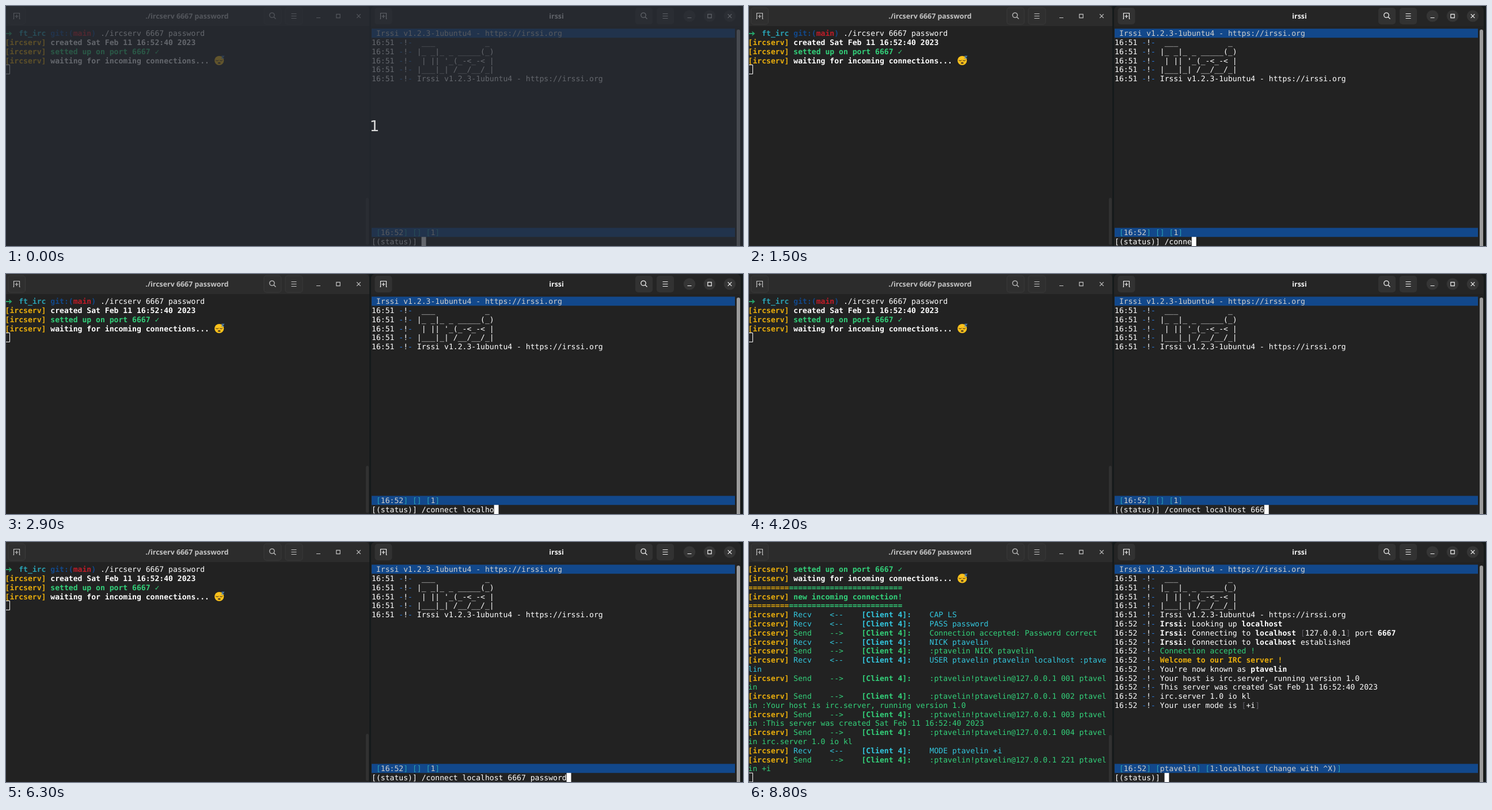
These frames come from a looping animation (1280 px wide and 418 px high, 9300 ms). An HTML page with a canvas:

```html
<!DOCTYPE html>
<html lang="en">
<head>
<meta charset="utf-8">
<title>IRC server demo</title>
<style>
html, body { margin: 0; width: 100%; height: 100%; overflow: hidden; background: #222; }
canvas { display: block; width: 1280px; height: 418px; }
</style>
</head>
<body>
<canvas id="stage" width="1280" height="418"></canvas>
<script>
const ctx = document.getElementById('stage').getContext('2d');
ctx.textRendering = 'geometricPrecision';
const LOOP = 9300, ENTER = 6500;
const CELL = 7.875, ROW = 15.77, TOP = 39.5, BASELINE = 12.9;
const LEFT = -1.5, RIGHT = 635;
const MONO = '13.08px "DejaVu Sans Mono", monospace';
const NICK = 'ptavelin';
const COMMAND = '/connect localhost 6667 password';
const KEY_TIMES = [
  500, 600, 1200, 1300, 1500, 1500, 1700, 2000, 2100, 2200, 2400,
  2500, 2600, 2600, 2800, 2900, 3000, 3100, 3400, 3900, 4000, 4200,
  4400, 4600, 5000, 5100, 5200, 5500, 5700, 5800, 5900, 6300
];

// Style letters for "~x" markup; an upper-case letter means bold.
const INK = {
  w: '#ffffff', y: '#e9ad0c', g: '#33d17a', c: '#33c7de', t: '#2aa1b3',
  b: '#12488b', r: '#c01c28', e: '#26a269', l: '#d0cfcc', d: '#5e5c64', u: '#2a7bde'
};

const TAG = '~Y[ircserv] ';
const READY = TAG + '~Gsetted up on port 6667 ~g✓';
const WAITING = TAG + '~Wwaiting for incoming connections...';
const RULE = '~Y' + '='.repeat(9) + '~G' + '='.repeat(25);
const recv = text => TAG + '~cRecv    <--    ~C[Client 4]:~c    ' + text;
const send = text => TAG + '~gSend    -->    ~G[Client 4]:~g    ' + text;

// Long messages continue on the next row after 39 characters.
function wrap(make, text) {
  const rest = text.slice(39);
  const style = make === recv ? '~c' : '~g';
  return rest ? [make(text.slice(0, 39)), style + rest] : [make(text)];
}
const reply = (code, text) =>
  wrap(send, `:${NICK}!${NICK}@127.0.0.1 ${code} ${NICK}${text}`);

const SERVER_IDLE = [
  '~T   ft_irc ~Bgit:(~Rmain~B) ~w./ircserv 6667 password',
  TAG + '~Wcreated Sat Feb 11 16:52:40 2023',
  READY,
  WAITING
];
const SERVER_BUSY = [
  READY, WAITING, RULE, TAG + '~Gnew incoming connection!', RULE,
  recv('CAP LS'),
  recv('PASS password'),
  send('Connection accepted: Password correct'),
  recv('NICK ' + NICK),
  send(`:${NICK} NICK ${NICK}`),
  ...wrap(recv, `USER ${NICK} ${NICK} localhost :${NICK}`),
  ...reply('001', ''),
  ...reply('002', ' :Your host is irc.server, running version 1.0'),
  ...reply('003', ' :This server was created Sat Feb 11 16:52:40 2023'),
  ...reply('004', ' irc.server 1.0 io kl'),
  recv(`MODE ${NICK} +i`),
  ...reply('221', ' +i')
];

const VERSION = 'Irssi v1.2.3-1ubuntu4 - https://irssi.org';
const note = (time, text) => `~w${time} ~u-~w!~u- ~w${text}`;
const BANNER = [
  ' ___' + ' '.repeat(11) + '_',
  '|_ _|_ _ _____(_)',
  " | || '_(_-<_-< |",
  '|___|_| /__/__/_|',
  VERSION
].map(text => note('16:51', text));
const JOINED = [
  '~WIrssi:~w Looking up ~Wlocalhost',
  '~WIrssi:~w Connecting to ~Wlocalhost ~d[~w127.0.0.1~d]~w port ~W6667',
  '~WIrssi:~w Connection to ~Wlocalhost~w established',
  '~gConnection accepted !',
  '~YWelcome to our IRC server !',
  "You're now known as ~W" + NICK,
  'Your host is irc.server, running version 1.0',
  'This server was created Sat Feb 11 16:52:40 2023',
  'irc.server 1.0 io kl',
  'Your user mode is ~d[~w+i~d]'
].map(text => note('16:52', text));

function box(x, y, w, h, color) {
  ctx.fillStyle = color;
  ctx.fillRect(x, y, w, h);
}

function round(x, y, w, h, r, color) {
  ctx.fillStyle = color;
  ctx.beginPath();
  ctx.roundRect(x, y, w, h, r);
  ctx.fill();
}

function stroke(color, width, draw) {
  ctx.strokeStyle = color;
  ctx.lineWidth = width;
  ctx.beginPath();
  draw();
  ctx.stroke();
}

function segment(x1, y1, x2, y2) {
  ctx.moveTo(x1, y1);
  ctx.lineTo(x2, y2);
}

function disc(x, y, r, color) {
  ctx.fillStyle = color;
  ctx.beginPath();
  ctx.arc(x, y, r, 0, Math.PI * 2);
  ctx.fill();
}

function label(text, x, y, font, color) {
  ctx.font = font;
  ctx.fillStyle = color;
  ctx.textAlign = 'center';
  ctx.fillText(text, x, y);
  ctx.textAlign = 'left';
}

// Writes one row of marked-up text on the character grid.
function line(x0, row, markup) {
  const y = TOP + row * ROW + BASELINE;
  let col = 0;
  for (const part of markup.split('~').slice(1)) {
    const key = part[0], low = key.toLowerCase();
    ctx.font = (key === low ? '' : 'bold ') + MONO;
    ctx.fillStyle = INK[low];
    for (const ch of part.slice(1)) {
      if (ch !== ' ') ctx.fillText(ch, x0 + col * CELL, y);
      col++;
    }
  }
}

function promptArrow() {
  const y = TOP + 8.5;
  stroke(INK.e, 2, () => segment(0, y, 7, y));
  ctx.fillStyle = INK.e;
  ctx.beginPath();
  ctx.moveTo(5, y - 4.5);
  ctx.lineTo(10.5, y);
  ctx.lineTo(5, y + 4.5);
  ctx.lineTo(6.5, y);
  ctx.fill();
}

function sleepyFace(row) {
  const x = 370.3, y = TOP + row * ROW + 8.2;
  disc(x, y, 8.1, '#fcc21b');
  stroke('#5f4a22', 1.2, () => {
    ctx.arc(x - 3.6, y - 1.6, 2.1, 0.2, Math.PI - 0.2);
    ctx.moveTo(x + 5.2, y - 1.2);
    ctx.arc(x + 3.2, y - 1.6, 2.1, 0.2, Math.PI - 0.2);
  });
  ctx.fillStyle = '#5f4a22';
  ctx.beginPath();
  ctx.ellipse(x, y + 4.2, 2.4, 1.8, 0, 0, Math.PI * 2);
  ctx.fill();
  stroke('#4a86c5', 1.2, () => {
    ctx.moveTo(x + 4, y - 7.6);
    ctx.lineTo(x + 8, y - 7.6);
    ctx.lineTo(x + 4.5, y - 4);
    ctx.lineTo(x + 8.5, y - 4);
  });
}

function button(cx, active) {
  if (active) return round(cx - 15, 3, 30, 29, 5, '#323232');
  round(cx - 15.5, 2.5, 31, 30, 5, '#3a3a3a');
  round(cx - 14.5, 3.5, 29, 28, 4, '#2f2f2f');
}

function header(title, center, tab, search, menu, controls, active) {
  const ink = active ? '#f2f2f2' : '#c4c4c4';
  [tab, search, menu].forEach(cx => button(cx, active));
  label(title, center, 22, 'bold 12.4px "Noto Sans", sans-serif', ink);
  stroke(ink, 1.2, () => {
    ctx.moveTo(tab - 6, 22.5);
    ctx.lineTo(tab - 5, 22.5);
    ctx.lineTo(tab - 5, 12.5);
    ctx.lineTo(tab + 5, 12.5);
    ctx.lineTo(tab + 5, 22.5);
    ctx.lineTo(tab + 6, 22.5);
    segment(tab - 3, 18, tab + 3, 18);
    segment(tab, 15, tab, 21);
  });
  stroke(ink, 1.3, () => {
    ctx.arc(search - 1, 16, 4.2, 0, Math.PI * 2);
    segment(search + 2, 19, search + 5.5, 22.5);
  });
  stroke(ink, 1.2, () => {
    for (const y of [13.5, 17.5, 21.5]) segment(menu - 4.5, y, menu + 4.5, y);
  });
  const [min, max, close] = controls;
  if (active) controls.forEach(cx => disc(cx, 17.5, 10.3, '#353535'));
  stroke(ink, 1.2, () => {
    segment(min - 3.5, 20.5, min + 3.5, 20.5);
    ctx.rect(max - 3.2, 14.3, 6.4, 6.4);
    segment(close - 3.3, 14.2, close + 3.3, 20.8);
    segment(close + 3.3, 14.2, close - 3.3, 20.8);
  });
}

function serverWindow(joined) {
  box(0, 0, 631, 418, '#222222');
  round(0, 0, 631, 35, [0, 7, 0, 0], '#2c2c2c');
  header('./ircserv 6667 password', 314.5, 18.5, 463, 500, [542.5, 577, 612.5], false);
  const rows = joined ? SERVER_BUSY : SERVER_IDLE;
  rows.forEach((text, i) => line(LEFT, i, text));
  if (!joined) promptArrow();
  sleepyFace(joined ? 1 : 3);
  const y = TOP + rows.length * ROW;
  stroke('#ffffff', 1, () => ctx.rect(LEFT + 0.5, y, CELL - 0.4, ROW));
  round(625, joined ? 336 : 334, 5, 82, 2.5, '#313131');
}

function clientWindow(t, joined) {
  round(634, 0, 642, 418, [8, 8, 0, 0], '#222222');
  round(634, 0, 642, 35, [8, 8, 0, 0], '#252525');
  header('irssi', 956, 655.5, 1108, 1145, [1187, 1222, 1257], true);
  round(1269, 41, 6, 382, 3, '#9c9c9c');

  box(RIGHT, TOP, 631, ROW, INK.b);
  line(RIGHT, 0, '~l ' + VERSION);
  BANNER.forEach((text, i) => line(RIGHT, i + 1, text));
  if (joined) JOINED.forEach((text, i) => line(RIGHT, i + 6, text));

  box(RIGHT, TOP + 22 * ROW, 631, ROW, INK.b);
  const user = joined ? NICK : '';
  const place = joined ? '1:localhost (change with ^X)' : '1';
  line(RIGHT, 22, `~t [~l16:52~t] [~l${user}~t] [~l${place}~t]`);

  const typed = joined ? 0 : KEY_TIMES.filter(k => k <= t).length;
  line(RIGHT, 23, '~w[(status)] ' + COMMAND.slice(0, typed));
  const hidden = t >= 7000 && Math.floor((t - 7000) / 600) % 2 === 0;
  if (!hidden) box(RIGHT + (11 + typed) * CELL, TOP + 23 * ROW, CELL, ROW, '#ffffff');
}

function countdown() {
  box(0, 0, 1280, 418, 'rgba(40, 44, 52, 0.72)');
  label('1', 640, 218, '26px "DejaVu Sans", sans-serif', '#dcdcdc');
}

function draw(t) {
  const joined = t >= ENTER;
  box(0, 0, 1280, 418, '#151a1b');
  serverWindow(joined);
  clientWindow(t, joined);
  if (t < 100) countdown();
}

function tick() {
  draw(performance.now() % LOOP);
  requestAnimationFrame(tick);
}
tick();
</script>
</body>
</html>
```
